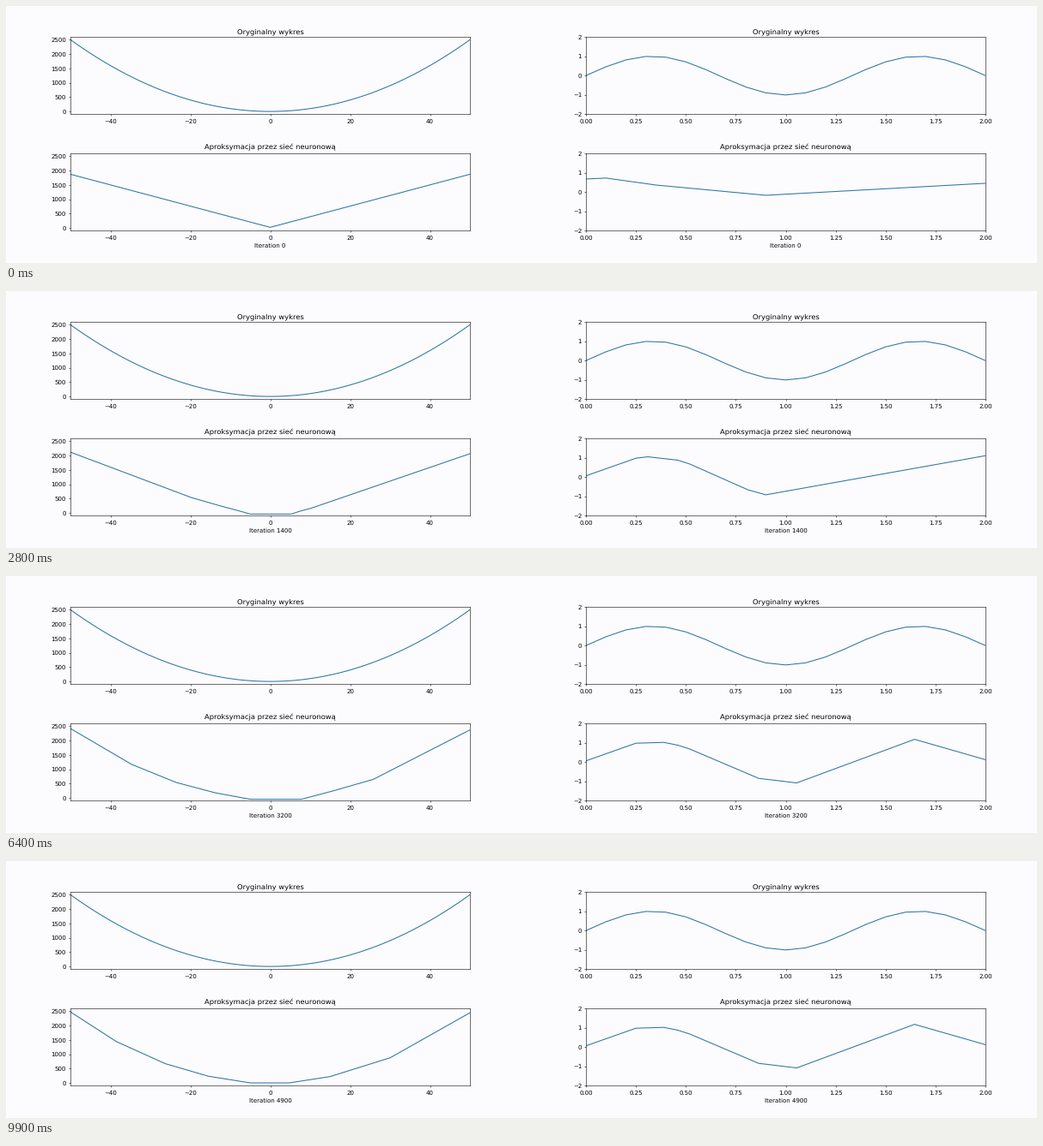
A matplotlib script for the animation above (10000 ms loop, 1200 px wide and 300 px high).

```python
import numpy as np
import matplotlib.pyplot as plt
from matplotlib.animation import FuncAnimation

W, H, DPI = 1200, 300, 50
STATES = 50
STEP_MS = 200
PAPER = "#fcfbfe"
BLUE = "#2b75a6"

plt.rcParams["font.family"] = "DejaVu Sans"
plt.rcParams["text.hinting"] = "none"
fig = plt.figure(figsize=(W / DPI, H / DPI), dpi=DPI, facecolor=PAPER)


def square(x):
    return x ** 2


def wave(x):
    return np.sin(1.5 * np.pi * x)


def mix(a, b, t):
    return a + (b - a) * t


def trough(x, k):
    """Early fit of the parabola: two straight arms over a widening flat floor."""
    return np.maximum(0, (37 + 0.6 * k) * (np.abs(x) - 0.4 * k + 0.5))


def bowl(x, k):
    """Late fit: bends lie on the parabola, with a floor that sags at first."""
    left_to_learn = np.exp(-max(k - 18, 0) / 10)
    outer = 39.5 - 19.5 * left_to_learn
    right = 31 - 21 * left_to_learn
    flat = np.interp(k, [18, 32, 39, 49], [5.5, 7.8, 7.8, 4.8])
    sag = np.interp(k, [26, 39], [-90, 0])

    arm_l = np.array([-outer, -0.68 * outer, -0.4 * outer])
    arm_r = np.array([mix(flat, right, 0.4), right])

    def height(b):
        return 0.97 * square(b) + sag * np.exp(-square(b / 10))

    bends = np.concatenate([[-50], arm_l, [-5, flat], arm_r, [50]])
    heights = np.concatenate([
        [2485 - 275 * left_to_learn], height(arm_l), [sag, sag],
        height(arm_r), [2460 - 370 * left_to_learn]])
    return np.interp(x, bends, heights)


def parabola_fit(x, k):
    return mix(trough(x, k), bowl(x, k), np.interp(k, [9, 20], [0, 1]))


def wave_fit(x, k):
    def key(*values):
        return np.interp(k, [18, 26, 32], values)

    # The last rise is straight until a second peak enters from the right.
    top, dip, turn = key(.31, .43, .39), key(.81, .85, .865), key(.9, .97, 1.055)
    peak, peak_y = key(2, 1.59, 1.645), key(1.1, .65, 1.17)
    turn_y, end_y = key(-.92, -1.05, -1.08), key(1.1, .58, .12)

    inner = np.array([.25, top, .46, .52, dip])
    bends = [0, *inner, turn, peak, 2]
    heights = [.06, *(1.05 * wave(inner)), turn_y, peak_y, end_y]
    learned = np.interp(x, bends, heights)

    untrained = np.interp(x, [0, .1, .34, .9, 2], [.67, .72, .37, -.17, .45])
    return mix(untrained, learned, 1 - max(0, 1 - k / 9) ** 3)


def add_plot(left, top, title, axis):
    width, height = 465, 90.45
    ax = fig.add_axes([left / W, 1 - (top + height) / H, width / W, height / H],
                      facecolor=PAPER)
    ax.set(**axis)
    ax.set_title(title)
    return ax


def add_column(left, func, samples, **axis):
    x = np.linspace(*axis["xlim"], samples)
    upper = add_plot(left, 36, "Oryginalny wykres", axis)
    upper.plot(x, func(x), color=BLUE)
    lower = add_plot(left, 171.9, "Aproksymacja przez sieć neuronową", axis)
    line, = lower.plot([], [], color=BLUE)
    return lower, line, np.linspace(*axis["xlim"], 401)


parabola = add_column(
    75, square, 101, xlim=(-50, 50), ylim=(-100, 2600),
    xticks=range(-40, 41, 20), yticks=range(0, 2501, 500))
sine = add_column(
    675, wave, 21, xlim=(0, 2), ylim=(-2, 2),
    xticks=np.arange(0, 2.01, 0.25), yticks=range(-2, 3))


def update(k):
    for (ax, line, x), fit in ((parabola, parabola_fit), (sine, wave_fit)):
        line.set_data(x, fit(x, k))
        ax.set_xlabel(f"Iteration {100 * k}")
    return parabola[1], sine[1]


anim = FuncAnimation(fig, update, frames=STATES, interval=STEP_MS,
                     init_func=lambda: update(0), repeat=True, repeat_delay=0)
plt.show()
```
